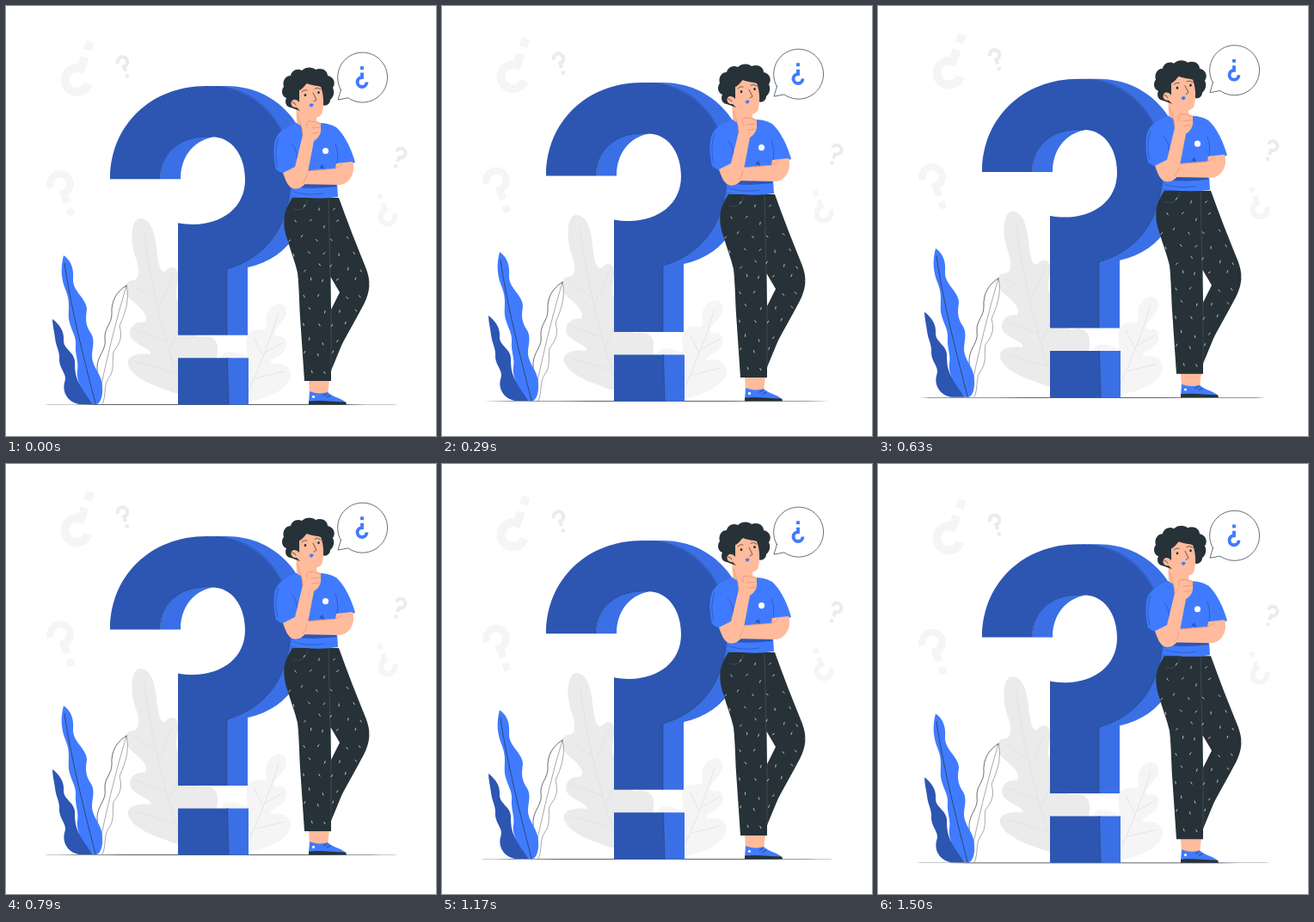
An HTML page for the animation above (1540 ms loop, 500 by 500 pixels).

```html
<!DOCTYPE html>
<html lang="en">
<head>
<meta charset="utf-8">
<title>Thinking it over</title>
<style>
  html, body { margin: 0; width: 100%; height: 100%; overflow: hidden; background: #fff; }
  svg { display: block; width: 100vw; height: 100vh; }
  .blue { fill: #407bff; }
  .mid { fill: #3a6fe6; }
  .deep { fill: #2d56b3; }
  .ink { fill: #263238; }
  .skin { fill: #ffbb9b; }
  .pale { fill: #f5f5f5; }
  .grey { fill: #ebebeb; }
  .line { fill: none; stroke: #263238; stroke-width: .7; stroke-linecap: round; stroke-linejoin: round; }
  .vein { fill: none; stroke: #e0e0e0; stroke-width: .8; }
  .fold { fill: none; stroke: #2d56b3; stroke-width: .8; stroke-linecap: round; }
  .crease { fill: none; stroke: #e58f72; stroke-width: .7; stroke-linecap: round; }
</style>
</head>
<body>
<svg viewBox="0 0 500 500">
  <defs>
    <g id="ask">
      <path d="M-14 0A14 14 0 1 1 0 14V28" fill="none" stroke="currentColor" stroke-width="10"/>
      <rect x="-5" y="37" width="10" height="10" fill="currentColor"/>
    </g>
    <path id="pants" d="M333 223H387C397 251 408 279 419 306C424 320 424 331 416 347C407 364 397 381 390 395L378 424V436H347L342 362C341 345 341 330 339 310C336 297 331 285 327 271C321 252 322 240 333 223ZM377.500 315L378 353L388 333Z" fill-rule="evenodd"/>
    <clipPath id="cloth"><use href="#pants" clip-rule="evenodd"/></clipPath>
  </defs>

  <g id="scene">
    <g id="marks"></g>

    <!-- pale foliage -->
    <path class="grey" d="M155 247C145 249 144 275 151 293C156 308 155 318 148 319C137 318 136 335 148 344C159 353 167 362 161 368C149 365 139 378 147 388C157 397 171 400 168 405C153 403 139 407 142 418C149 433 168 440 196 450L215 452C234 446 244 425 246 402C248 389 239 382 229 384C218 387 216 376 222 362C230 340 214 335 204 343C196 346 198 331 200 318C202 305 194 300 187 307C181 313 178 304 176 290C174 268 170 246 155 247Z"/>
    <path class="vein" d="M160 262Q174 365 206 450M150 326L176 344M148 375L187 390M150 413L196 427M195 312L178 350M214 345L191 397"/>
    <path class="pale" d="M318 346C306 348 300 360 303 372C302 382 291 372 283 380C274 390 284 402 279 407C268 402 254 398 251 408C252 425 264 445 272 460H284C304 456 326 447 331 431C331 417 320 414 311 416C304 416 309 411 317 407C328 401 330 386 320 384C309 386 310 380 317 372C327 363 331 349 318 346Z"/>
    <path class="vein" d="M317 357Q300 410 277 459M288 385L299 407M323 391L301 403M323 425L290 433M257 410L286 440"/>

    <!-- blue foliage -->
    <path d="M140 325C128 332 122 344 123 358C123 370 114 374 115 387C117 400 107 405 106 419C107 433 101 441 104 463H113C117 452 113 443 119 433C127 423 123 412 125 402C134 390 135 384 132 372C139 356 144 341 140 325Z" fill="#fff"/>
    <path class="line" d="M104 463C101 441 107 433 106 419C107 405 117 400 115 387C114 374 123 370 123 358C122 344 128 332 140 325"/>
    <path class="line" d="M140 325C144 341 139 356 132 372C135 384 134 390 125 402C123 412 127 423 119 433C113 443 117 452 112 463M140 325Q122 385 107 459" stroke-opacity=".6"/>
    <path class="deep" d="M54 364C62 370 68 378 67 389C67 399 79 402 80 413C80 425 81 432 86 440L101 463H85C73 461 65 450 68 438C72 428 63 424 62 412C63 402 58 396 57 386C56 378 54 371 54 364Z"/>
    <path class="blue" d="M67 290C76 296 79 306 78 317C77 332 94 340 94 353C92 366 93 372 99 381C104 390 100 398 100 407C100 420 112 428 112 443C113 455 109 463 105 463H101C92 450 81 438 83 424C85 414 80 406 81 394C82 384 75 376 73 364C72 354 75 345 70 332C64 318 63 305 67 290Z"/>
    <path class="line" d="M68 299C74 342 88 401 104 462"/>

    <ellipse class="ink" cx="250" cy="463.600" rx="205" ry=".4"/>

    <!-- large mark -->
    <path class="mid" d="M236 93H256C315 93 355 140 355 197C355 247 333 293 281 304V382.800H256V290L300 250V150Z"/>
    <path class="deep" d="M121 201.300C121 139 168 93 233 93C291 93 331 136 331 197C331 255 304 292 257 306V382.800H200V252.300C243 260 278 239 278 202C278 173 262 152.300 240 152.300C205 152 180 168 179 201.300Z"/>
    <path class="mid" d="M179 201.300C180 167 207 149 240 152.500C218 157 203 175 203 201.300Z"/>
    <path class="line" d="M245 93.500C296 97 331 138 331 197C331 255 304 292 257 306V382M179 201C180 167 207 149 240 152.500" stroke-opacity=".55" stroke-width=".6"/>
    <path class="deep" d="M200 409.300H259V463.500H200Z"/>
    <path class="mid" d="M257.500 409.300H282V463.500H259Z"/>
    <path class="line" d="M257.500 409.300L259 463" stroke-opacity=".55"/>

    <!-- legs -->
    <path class="skin" d="M352 435H376L374 452H353Z"/>
    <path class="blue" d="M353 448C360 451 368 451 374 449C380 455 391 456 396 462H352Z"/>
    <path class="ink" d="M352 459.500C365 458 381 460 395 460.500L396 463.500H352Z"/>
    <circle cx="357.500" cy="454.300" r="1.600" fill="#fff"/>
    <path class="line" d="M369 453L373 451M373 455L377 453"/>
    <use href="#pants" class="ink"/>
    <path d="M375 224L377 315M334 236Q347 241 351 225M378 353V424" fill="none" stroke="#4d5a60" stroke-width=".6"/>
    <g id="flecks" clip-path="url(#cloth)" stroke="#fff" stroke-width=".7" stroke-linecap="round"></g>

    <!-- torso -->
    <path class="skin" d="M337 112H360L362 145Q349 149 338 137Z"/>
    <path class="blue" d="M338 136C326 140 316 146 313 156C310 168 312 180 314 190Q320 195 325 194L336 188L335 210L331 220Q358 226 386 222L384 188L406 182C402 167 394 150 384 141C377 137 370 136 364 136Q350 146 338 136Z"/>
    <path class="fold" d="M317 153Q311 169 316 187M332 160Q342 170 337 186M383 160Q388 174 384 187M366 186L370 190M334 216Q350 221 369 218"/>
    <path class="deep" d="M338 207H384L384 210Q360 213 339 211ZM364 188L368 184L370 189Z"/>
    <circle cx="371.500" cy="168.500" r="3.600" fill="#fff"/>
    <path class="skin" d="M345 192L383 189L384 183L403 181C407 193 400 207 388 208L340 207Z"/>
    <path class="crease" d="M350 192L383 189M383 189Q389 187 391 184"/>

    <!-- head -->
    <path class="ink" d="M331 118C325 117 324 111 326 107C320 105 320 97 323 94C321 87 325 81 331 81C332 75 339 72 344 75C349 70 357 71 360 74C367 71 374 75 374 81C381 82 384 90 380 95C383 101 380 107 377 109C377 114 372 117 368 115L342 122Z"/>
    <path class="skin" d="M341 98C345 97 347 92 350 90C356 93 362 92 366 94C370 104 370 118 367 126C361 133 350 130 343 123L338 118C332 119 329 112 334 109C338 108 340 111 341 112Z"/>
    <path class="line" d="M344 100Q346 97 350 98M359 96Q363 94 366 97" stroke-width="1.300"/>
    <path class="line" d="M357 101L361 109L358 111M333 112Q336 112 337 115"/>
    <ellipse class="ink" cx="348" cy="103.500" rx="1.300" ry="1.600"/>
    <ellipse class="ink" cx="363.500" cy="100.500" rx="1.300" ry="1.600"/>
    <path class="blue" d="M352.500 115Q355 112 357.500 114.500Q357 118 354 117.500Z"/>

    <!-- raised arm -->
    <path class="skin" d="M322 194C325 203 328 210 333 212C340 214 347 210 349 204L358 157C363 154 367 148 366 142L366 136C362 133 356 135 352 134L346 124C343 121 338 122 339 126L344 142L345 150L336 187Z"/>
    <path class="crease" d="M339 126L344 142L345 150M352 134Q347 138 351 142M352 134Q358 133 365 137M355 142L365 141M356 148L364 147M345 206Q349 202 350 196"/>

    <!-- thought -->
    <path class="line" d="M389.400 97.500L386 109L397.900 106.800A29 29 0 1 0 389.400 97.500Z" style="fill:#fff"/>
    <use href="#ask" color="#407bff" transform="translate(414 88.500) rotate(180) scale(.39)"/>
  </g>
</svg>
<script>
const $ = id => document.getElementById(id);

function add(parent, tag, attrs) {
  const el = document.createElementNS('http://www.w3.org/2000/svg', tag);
  for (const key in attrs) el.setAttribute(key, attrs[key]);
  parent.appendChild(el);
}

// x, y, angle, scale, colour
[
  [82.5, 86, 199, 1, '#f5f5f5'],
  [135.5, 65, -18, .41, '#ebebeb'],
  [63, 207, -20, .83, '#f5f5f5'],
  [459, 171, 21, .39, '#ebebeb'],
  [444, 245, 158, .6, '#f5f5f5']
].forEach(([x, y, angle, scale, color]) => add($('marks'), 'use', {
  href: '#ask', color,
  transform: `translate(${x} ${y}) rotate(${angle}) scale(${scale})`
}));

let seed = 17;
function random() {
  seed = seed * 16807 % 2147483647;
  return seed / 2147483647;
}

// Short, mostly upright flecks on the cloth
for (let row = 0; row < 12; row++) {
  for (let col = 0; col < 6; col++) {
    const x = 326 + col * 17 + row % 2 * 8 + random() * 5;
    const y = 232 + row * 17 + random() * 8;
    const turn = Math.PI * (.25 + random() * .6);
    const dx = Math.cos(turn) * 1.3, dy = Math.sin(turn) * 1.3;
    add($('flecks'), 'line', { x1: x - dx, y1: y - dy, x2: x + dx, y2: y + dy });
  }
}

const LOOP = 1540, STEPS = 37, HALF = 750, LEAD = 20, RISE = 10;
const lift = time => RISE * Math.max(0, 1 - Math.abs(time + LEAD - HALF) / HALF);

// Linear rise and fall, advanced at 24 steps a second
function draw(now) {
  const step = Math.floor(((now + 3) % LOOP) / LOOP * STEPS);
  const y = lift(0) - lift(step * LOOP / STEPS);
  $('scene').setAttribute('transform', `translate(0 ${y.toFixed(3)})`);
}

const start = performance.now();
function tick() {
  draw(performance.now() - start);
  requestAnimationFrame(tick);
}
tick();
</script>
</body>
</html>
```
